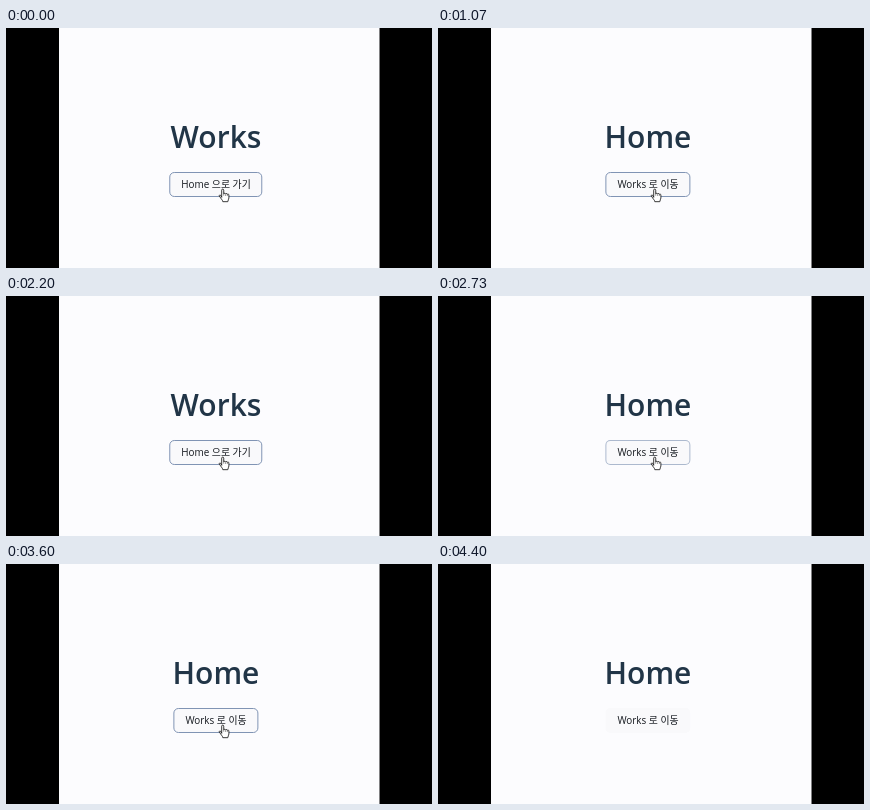
Write an HTML page that moves like this. It is 426 px wide and 240 px high and loops after 4470 ms.

```html
<!DOCTYPE html>
<html lang="ko">
<head>
<meta charset="utf-8">
<title>Home / Works</title>
<style>
  html, body { margin: 0; width: 100%; height: 100%; overflow: hidden; background: #000; }
  .stage { position: relative; width: 426px; height: 240px; overflow: hidden; }
  .stage, .stage * { box-sizing: border-box; }
  .view {
    position: absolute; left: 53px; top: 0; width: 321px; height: 240px;
    background: #fcfcfe; border-right: 1px solid #808082; color: #213547;
    font-family: "Open Sans", "Noto Sans CJK KR", sans-serif;
  }
  .page { position: absolute; left: 0; top: 0; width: 314px; height: 240px; text-align: center; }
  h1 {
    position: absolute; left: 0; top: 92px; width: 100%; margin: 0;
    font-size: 30px; line-height: 33px; font-weight: 600;
  }
  .button {
    position: absolute; left: 50%; top: 144px; transform: translateX(-50%);
    height: 25px; padding: 0 11px; white-space: nowrap;
    border: 1px solid transparent; border-radius: 5px; background: #f9f9fb;
    color: #14181e; font-size: 9.9px; line-height: 23px; font-weight: 500;
    animation: hover 4470ms infinite;
  }
  .works { animation: works 4470ms step-end infinite; }
  .home { animation: home 4470ms step-end infinite; }
  .cursor {
    position: absolute; left: 212px; top: 160px; width: 12px; height: 15px;
    animation: cursor 4470ms step-end infinite;
  }

  /* pages swap at 560, 1600 and 2600 ms */
  @keyframes works {
    0% { visibility: visible; }
    12.528% { visibility: hidden; }
    35.794% { visibility: visible; }
    58.166%, 100% { visibility: hidden; }
  }
  @keyframes home {
    0% { visibility: hidden; }
    12.528% { visibility: visible; }
    35.794% { visibility: hidden; }
    58.166%, 100% { visibility: visible; }
  }
  /* each new button fades its border in over 250 ms */
  @keyframes hover {
    0%, 12.527%, 19.016%, 35.793%, 42.282%, 58.165%, 64.653%, 82.103% { border-color: #8094b4; }
    12.528%, 13.423%, 35.794%, 36.689%, 58.166%, 59.06%, 87.696%, 100% { border-color: transparent; }
  }
  @keyframes cursor {
    0% { visibility: visible; }
    82.103%, 100% { visibility: hidden; }
  }
</style>
</head>
<body>
<div class="stage">
  <div class="view">
    <div class="page works">
      <h1>Works</h1>
      <div class="button">Home 으로 가기</div>
    </div>
    <div class="page home">
      <h1>Home</h1>
      <div class="button">Works 로 이동</div>
    </div>
  </div>
  <svg class="cursor" viewBox="0 0 13 16">
    <path d="M4 10V2.2a1.1 1.1 0 0 1 2.2 0V6.2c.2-.9 1.8-.9 2 .2.3-.8 1.8-.7 1.9.4.4-.7 1.7-.4 1.7.7v3.2c0 1.6-1.2 2.2-1.2 4H5.2c0-1.5-1.6-2.6-2.3-4L1.4 8.6c-.4-.9.7-1.6 1.4-.9z"
      fill="#fff" stroke="#111" stroke-width=".9" stroke-linejoin="round"/>
    <path d="M6.2 6.2v2M8.2 6.6v1.8M10.1 7v1.6" fill="none" stroke="#111" stroke-width=".5"/>
  </svg>
</div>
</body>
</html>
```
